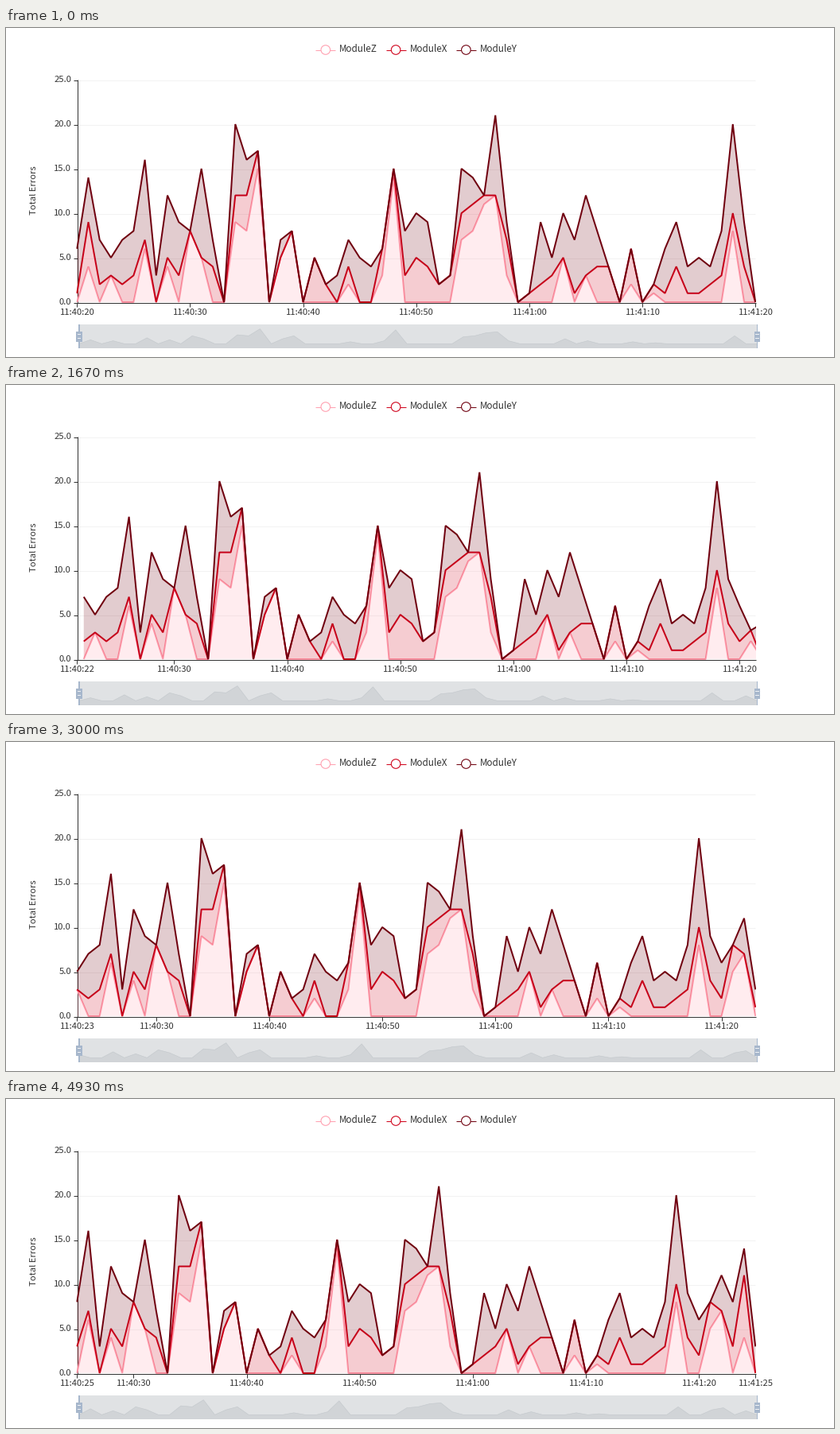
Animation, 1041 px wide and 414 px high, one loop 5.67 s. Source, as a matplotlib script:

```python
import matplotlib.pyplot as plt
import numpy as np
from matplotlib.animation import FuncAnimation
from matplotlib.patches import Circle, Polygon, Rectangle

W, H = 1041, 414
LOOP, INTERVAL = 5670, 30
TICK = LOOP / 85                      # the chart repaints about 15 times a second
LEAD = 20
UPDATES = [660, 1620, 2661, 3594, 4620]
EASE_MS = 300

X0, DX, SPAN = 89.3, 14.215, 60
Y0, UNIT = 345, 11.2
SLIDER_X, SLIDER_W, SLIDER_TOP, SLIDER_BOTTOM = 92, 852.5, 373, 403

INK = "#333333"
SERIES = [("ModuleZ", "#ffa0b0"), ("ModuleX", "#d0021b"), ("ModuleY", "#70000f")]


def error_totals():
    """Stacked totals per second for Z, X and Y, starting at 11:40:20."""
    top = np.array([
        6, 14, 7, 5, 7, 8, 16, 3, 12, 9, 8, 15, 7, 0, 20, 16, 17, 0, 7, 8, 0, 5,
        2, 3, 7, 5, 4, 6, 15, 8, 10, 9, 2, 3, 15, 14, 12, 21, 9, 0, 1, 9, 5, 10,
        7, 12, 8, 4, 0, 6, 0, 2, 6, 9, 4, 5, 4, 8, 20, 9, 6, 8, 11, 8, 14], float)
    # Up to two errors all belong to the lower modules
    middle = top.copy()
    middle[top > 2] = [
        1, 9, 2, 3, 2, 3, 7, 0, 5, 3, 8, 5, 4, 12, 12, 17, 5, 8, 5, 0, 4, 0, 0,
        6, 15, 3, 5, 4, 3, 10, 11, 12, 12, 7, 2, 3, 5, 1, 3, 4, 4, 6, 1, 4, 1,
        1, 2, 3, 10, 4, 2, 8, 7, 3, 11]
    # The lowest module mostly fails only when the middle total is high
    low = np.zeros_like(top)
    high = middle >= 5
    low[high] = middle[high] - [5, 1, 1, 0, 0, 3, 4, 2, 0, 0, 5, 3, 1, 5, 3, 3,
                                1, 0, 4, 0, 4, 2, 3, 0, 7]
    low[[3, 45]] = 3
    low[24], low[51] = 2, 1
    return np.array([low, middle, top])


TOTALS = error_totals()

# Newest second while it is still being counted, one column per update
PARTIAL = np.array([[0] * 6, [0, 0, 0, 1, 3, 0], [0, 0, 4, 3, 3, 3]], float)

plt.rcParams["font.family"] = "Noto Sans CJK JP"
fig = plt.figure(figsize=(W / 72, H / 72), dpi=72, facecolor="white")
ax = fig.add_axes([0, 0, 1, 1])
ax.set(xlim=(0, W), ylim=(H, 0))
ax.axis("off")


def line(xs, ys, color, width=1, z=1):
    return ax.plot(xs, ys, color=color, lw=width, zorder=z,
                   solid_capstyle="butt", solid_joinstyle="bevel")[0]


def label(x, y, text, size=11.2, ha="center", **extra):
    return ax.text(x, y, text, size=size, color=INK, ha=ha, va="baseline",
                   rotation_mode="anchor", **extra)


def shape(points, color, z, **extra):
    return ax.add_patch(Polygon(points, fc=color, lw=0, zorder=z, **extra))


def box(x, y, w, h, color, z):
    ax.add_patch(Rectangle((x, y), w, h, fc=color, lw=0, zorder=z))


def draw_legend():
    for i, (name, color) in enumerate(SERIES):
        x = 389.3 + 88.3 * i
        line([x, x + 25], [27.5, 27.5], color)
        ax.add_patch(Circle((x + 12.5, 27.5), 5.8, fc="white", ec=color, lw=1.1, zorder=2))
        label(x + 30, 30, name, size=11.7, ha="left")


def draw_axes():
    for value in range(0, 30, 5):
        y = Y0 + 0.5 - value * UNIT
        if value:
            line([90, 942], [y, y], "#f2f2f2", z=0)
        line([85, 90], [y, y], INK)
        label(82, y + 3, f"{value:.1f}", ha="right")
    line([89.5, 89.5], [65, 346], INK)
    line([89, 943], [345.5, 345.5], INK)
    label(37.5, 204.5, "Total Errors", rotation=90)


def draw_handle(cx):
    half = [(0.8, 0), (0.8, 8.5), (3.7, 8.5), (3.7, 21.5), (0.8, 21.5), (0.8, 30)]
    outline = half + [(-x, y) for x, y in reversed(half)]
    shape([(cx + x, SLIDER_TOP + y) for x, y in outline], "#a7b7cc", 8)
    for y in (12.1, 16.7):
        box(cx - 2.2, SLIDER_TOP + y, 4.3, 1.2, "#eef1f4", 9)


draw_legend()
draw_axes()
box(SLIDER_X, SLIDER_TOP, SLIDER_W, SLIDER_BOTTOM - SLIDER_TOP, "#e0e2e4", 5)
draw_handle(SLIDER_X)
draw_handle(SLIDER_X + SLIDER_W)

plot_area = Rectangle((88, 60), 855, 290, transform=ax.transData)
areas, lines = [], []
for i, (_, color) in enumerate(SERIES):
    areas.append(shape([(0, 0), (1, 1), (1, 0)], color, 2 + 0.2 * i, alpha=0.2))
    lines.append(line([], [], color, 2, 2.1 + 0.2 * i))
    areas[-1].set_clip_path(plot_area)
    lines[-1].set_clip_path(plot_area)

shadow = shape([(0, 0), (1, 1), (1, 0)], "#d1d4d7", 6)
shadow_edge = line([], [], "#c3c8cc", 0.6, 7)
tick_marks = [line([], [], INK) for _ in range(8)]
tick_labels = [label(0, 361, "") for _ in range(8)]


def window(step):
    return np.column_stack([TOTALS[:, step:step + SPAN], PARTIAL[:, step]])


def clock(second):
    minute, sec = divmod(20 + second, 60)
    return f"11:{40 + minute}:{sec:02d}"


def state_at(ms):
    """Return the number of updates so far and the eased progress of the last one."""
    step = sum(ms >= start for start in UPDATES)
    if step == 0:
        return 0, 1.0
    t = min((ms - UPDATES[step - 1]) / EASE_MS, 1)
    return step, 1 - (1 - t) ** 3


def update_series(values, shift, progress, step):
    values = values.copy()
    if step:
        before = PARTIAL[:, step - 1]
        values[:, -2] = before + (values[:, -2] - before) * progress
    xs = X0 + DX * np.arange(SPAN + 1) + shift
    floor = np.full(SPAN + 1, float(Y0))
    for area, stroke, row in zip(areas, lines, values):
        ys = Y0 - UNIT * row
        stroke.set_data(xs, ys)
        area.set_xy(np.column_stack([np.r_[xs, xs[::-1]], np.r_[ys, floor[::-1]]]))
        floor = ys


def update_slider(row):
    # Vertical range is padded by 30 % of the peak on both sides
    pad = 0.3 * row.max()
    height = SLIDER_BOTTOM - SLIDER_TOP
    ys = SLIDER_BOTTOM - height * (row + pad) / (row.max() + 2 * pad)
    xs = np.linspace(SLIDER_X, SLIDER_X + SLIDER_W, SPAN + 1)
    shadow_edge.set_data(xs, ys)
    ends = [(xs[-1], SLIDER_BOTTOM), (xs[0], SLIDER_BOTTOM)]
    shadow.set_xy(np.vstack([np.column_stack([xs, ys]), ends]))


def update_ticks(step, shift):
    last = step + SPAN
    marks = {s: X0 + DX * (s - step) + shift
             for s in range(step, last + 1) if s % 10 == 0}
    marks.setdefault(step, X0)
    if last % 10 > 3:                 # closer end labels would overlap
        marks.setdefault(last, X0 + DX * SPAN)
    slots = list(marks.items()) + [(None, 0)] * (len(tick_marks) - len(marks))
    for mark, text, (second, x) in zip(tick_marks, tick_labels, slots):
        visible = second is not None
        mark.set_visible(visible)
        text.set_visible(visible)
        if visible:
            mark.set_data([x, x], [346, 351])
            text.set_x(x + 0.5)
            text.set_text(clock(second))


def update(frame):
    ms = int((frame * INTERVAL + LEAD) / TICK) * TICK
    step, progress = state_at(ms)
    shift = DX * (1 - progress)
    values = window(step)
    update_series(values, shift, progress, step)
    update_slider(values[0])
    update_ticks(step, shift)
    return []


anim = FuncAnimation(fig, update, frames=LOOP // INTERVAL, interval=INTERVAL,
                     init_func=lambda: update(0), repeat=True, repeat_delay=0)
plt.show()
```
